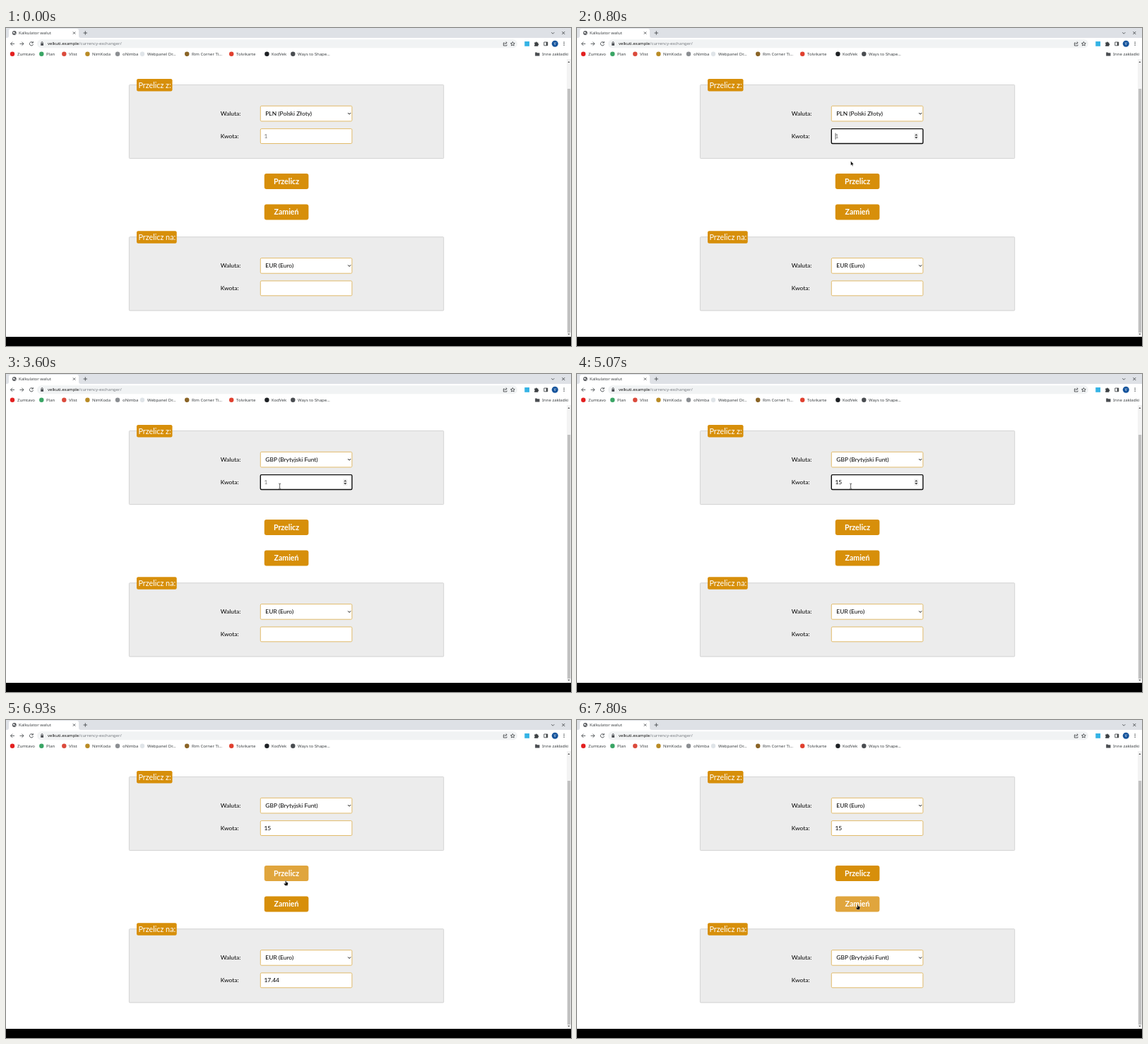
Write an HTML page that moves like this. It is 800x450 px and loops after 8000 ms.

```html
<!DOCTYPE html>
<html lang="pl">
<head>
<meta charset="utf-8">
<title>Kalkulator walut</title>
<style>
  html, body { margin: 0; width: 100%; height: 100%; overflow: hidden; background: #fff; }
  svg { display: block; width: 100%; height: 100%; }
  .ui { font: 6px "Noto Sans", "Open Sans", sans-serif; fill: #3c4043; }
  .page { font: 8.45px Lato, sans-serif; fill: #000; }
  .legend { font-size: 10.8px; fill: #fff; }
  .button { font-size: 10.6px; font-weight: bold; fill: #fff; text-anchor: middle; }
  .line { fill: none; stroke: #4a4d51; stroke-width: .9; }
  .field { fill: #fff; stroke: #dfb55c; stroke-width: .9; }
  .field.focus { stroke: #101010; stroke-width: 1.4; }
</style>
</head>
<body>
<svg viewBox="0 0 800 450">
  <rect width="800" height="450" fill="#fff"/>
  <g class="ui">
    <rect width="800" height="14" fill="#dee1e6"/>
    <path d="M1 14Q4 14 4 11V4Q4 1 7 1H100Q103 1 103 4V11Q103 14 106 14Z" fill="#fff"/>
    <circle cx="11.8" cy="7" r="2.9" fill="#55585c"/>
    <path d="M9.7 6.2l1.8-.9 1 1.1-1.2 1.8zM12.5 8l1.5-.5-.7 1.5z" fill="#fff"/>
    <text x="18" y="9.2">Kalkulator walut</text>
    <path class="line" d="M94.9 5.4l3.3 3.3m0-3.3l-3.3 3.3M109.6 7h5.4M112.3 4.3v5.4M772.3 6.2l2 2 2-2M787.3 5l4 4m0-4l-4 4"/>

    <rect x="44" y="16.2" width="680" height="12" rx="6" fill="#f1f3f4"/>
    <path class="line" d="M12 22.3H6.5m2.6-2.6l-2.6 2.6 2.6 2.6M19.5 22.3H25m-2.6-2.6l2.6 2.6-2.6 2.6M38 20.7a2.6 2.6 0 1 0 .5 2.2M38.3 19v2.1h-2.1"/>
    <path d="M49.2 21.6h3.8v3.2h-3.8z" fill="#4a4d51"/>
    <path class="line" d="M50 21.7v-1a1.1 1.1 0 0 1 2.2 0v1"/>
    <text x="59" y="24.4" fill="#111">velkuti.example<tspan fill="#777b80">/currency-exchanger/</tspan></text>
    <path class="line" stroke-width=".7" d="M706 21h-1.6v4h4.6v-1.5M706 23.2q.5-2.3 3-2.3m-1.2-1.4l1.5 1.4-1.5 1.4M717.4 19.5l.9 1.9 2 .2-1.5 1.4.4 2-1.8-1-1.8 1 .4-2-1.5-1.4 2-.2z"/>
    <rect x="734.3" y="19" width="6.8" height="6.8" fill="#35b4e5"/>
    <path d="M748.2 20.6h1.6a1 1 0 0 1 2 0h1.6v1.7a1 1 0 0 1 0 2v1.4h-5.2v-1.6a1 1 0 0 0 0-1.8z" fill="#3c4043"/>
    <path class="line" d="M761.8 20h5v4.8h-5z"/><path d="M764.8 20h2v4.8h-2z" fill="#3c4043"/>
    <circle cx="777.3" cy="22.3" r="4.5" fill="#17559d"/>
    <text x="777.3" y="24.2" font-size="5" text-anchor="middle" style="fill:#fff;font-size:5px">V</text>
    <path d="M789.5 19.5h1.2v1.2h-1.2zm0 2.2h1.2v1.2h-1.2zm0 2.2h1.2v1.2h-1.2z" fill="#3c4043"/>
    <g id="bookmarks"></g>
    <path d="M749.2 34.4h2.3l.8.9h3.2v4.3h-6.3z" fill="#4a4d51"/>
    <text x="759" y="39.1">Inne zakładki</text>
  </g>

  <rect x="794" y="44" width="6" height="393" fill="#f3f3f3"/>
  <rect x="795" y="86" width="4.2" height="345" fill="#c1c1c1"/>
  <path d="M795.4 49l1.5-2 1.5 2zM795.4 432.5l1.5 2 1.5-2z" fill="#555"/>
  <rect y="437" width="800" height="13"/>

  <g class="page">
    <g id="from"></g>
    <g id="to" transform="translate(0 215.3)"></g>
    <g id="buttons"></g>
    <g id="spinner">
      <rect x="477.3" y="148.4" width="6" height="9.6" fill="#efefef"/>
      <path d="M478.2 152.3l2.1-2.4 2.1 2.4zM478.2 154l2.1 2.4 2.1-2.4z" fill="#444"/>
    </g>
    <rect id="caret" y="148.6" width=".7" height="9.2" fill="#222"/>
  </g>
  <g id="pointer">
    <path id="arrow" d="M0 0V6.2L1.4 5 2.4 7.2 3.4 6.7 2.5 4.6H4.3Z" stroke="#fff" stroke-width=".4"/>
    <path id="beam" d="M-1.5-3.4Q0-3.4 0-2.6Q0-3.4 1.5-3.4M0-2.6V3.2M-1.5 3.9Q0 3.9 0 3.2Q0 3.9 1.5 3.9" fill="none" stroke="#333" stroke-width=".75"/>
    <path id="hand" d="M-.7.5Q0-.4.6.5V2.3L2.7 2.8Q3.3 3 3.1 4L2.5 7H-1.1L-2.7 4.6Q-2.7 3.6-1.7 4L-.7 4.7Z" stroke="#fff" stroke-width=".35"/>
  </g>
</svg>
<script>
const $ = id => document.getElementById(id);
const show = (id, on) => $(id).setAttribute('visibility', on ? 'visible' : 'hidden');
const within = (n, ...spans) => spans.some(([a, b]) => n >= a && n < b);
const GOLD = '#d78f0a', PALE = '#e0a53d';

// icon centre, icon colour, label start, label
const bookmarks = [
  [9, '#e32020', 16, 'Zumtavo'], [50.3, '#3aa565', 57, 'Plan'],
  [82.3, '#db4a3c', 89, 'Vlist'], [115.4, '#b98b25', 122, 'NimKoda'],
  [158, '#8b8e92', 165, 'oNimba'], [193, '#dfe4e8', 200, 'Webpanel Dr…'],
  [256.2, '#8a6426', 263, 'Rim Corner Ti…'], [319.2, '#e0402f', 326, 'Tolvikarte'],
  [369.4, '#1d2024', 376, 'KodVek'], [406.3, '#4a4d51', 413, 'Ways to Shape…']
];
$('bookmarks').innerHTML = bookmarks.map(([cx, color, x, name]) =>
  `<circle cx="${cx}" cy="36.8" r="3.2" fill="${color}"/><text x="${x}" y="39.1">${name}</text>`).join('');

function panel(id, title, width) {
  $(id).innerHTML = `
    <rect x="174.4" y="80.4" width="445.3" height="104.2" rx="1" fill="#ececec" stroke="#c9c9c9" stroke-width=".8"/>
    <rect x="185" y="72" width="${width}" height="17.4" rx="2.2" fill="${GOLD}"/>
    <text class="legend" x="187.4" y="84.6">${title}</text>
    <text x="303.8" y="124.1">Waluta:</text><text x="303.8" y="156.2">Kwota:</text>
    <rect class="field" x="360.3" y="110.3" width="129.6" height="21.6" rx="1.5"/>
    <path d="M484.2 120.1l2 2 2-2" fill="none" stroke="#111" stroke-width="1"/>
    <text id="${id}Unit" x="367.3" y="124.1"></text>
    <rect id="${id}Input" class="field" x="360.3" y="142.6" width="129.6" height="20.9" rx="1.5"/>
    <text id="${id}Value" x="365.4" y="156.2"></text>`;
}
panel('from', 'Przelicz z:', 50.5);
panel('to', 'Przelicz na:', 56.7);

const buttons = [['convert', 'Przelicz', 206], ['swap', 'Zamień', 249.4]];
$('buttons').innerHTML = buttons.map(([id, label, y]) =>
  `<rect id="${id}" x="365.8" y="${y}" width="62.6" height="22" rx="3"/>
   <text class="button" x="397" y="${y + 14.8}">${label}</text>`).join('');

// pointer stops: tick, x, y
const path = [
  [1, 440, 345], [6, 386, 155], [8, 386, 158], [12, 387.6, 188.3], [18, 392, 286],
  [26, 411, 124], [30, 411, 124], [31, 413, 131], [41, 418, 136], [45, 387.6, 158.4],
  [80, 387.6, 158.4], [89, 396, 219], [103, 396, 219], [104, 396.2, 227.2],
  [113, 397.6, 261.2], [120, 397.6, 261.2]
];
function pointerAt(n) {
  const i = Math.max(1, path.findIndex(p => p[0] >= n));
  const [a, x, y] = path[i - 1], [b, x2, y2] = path[i];
  const u = Math.max(0, (n - a) / (b - a)), s = u * u * (3 - 2 * u);
  return [x + (x2 - x) * s, y + (y2 - y) * s];
}

const PLN = 'PLN (Polski Złoty)', GBP = 'GBP (Brytyjski Funt)', EUR = 'EUR (Euro)';

function draw(n) {
  const [x, y] = pointerAt(n);
  const visible = n >= 1 && !within(n, [33, 41]);
  const over = (top, bottom, left, right) => visible && x > left && x < right && y > top && y < bottom;
  const onInput = over(142, 164, 360, 490);
  const hovers = buttons.map(([, , top]) => over(top, top + 22, 366, 428));
  const onButton = hovers.includes(true);
  buttons.forEach(([id], i) => $(id).setAttribute('fill', hovers[i] ? PALE : GOLD));

  const swapped = n >= 115;
  $('fromUnit').textContent = swapped ? EUR : n < 41 ? PLN : GBP;
  $('toUnit').textContent = swapped ? GBP : EUR;
  const typed = '15'.slice(0, Math.max(0, n - 65));
  $('fromValue').textContent = typed || '1';
  $('fromValue').setAttribute('fill', typed ? '#000' : '#777');
  $('toValue').textContent = within(n, [95, 115]) ? '17.44' : '';

  const focus = within(n, [7, 26], [48, 93]);
  $('fromInput').classList.toggle('focus', focus);
  show('spinner', focus || onInput);
  show('caret', within(n, [7, 14], [48, 54], [66, 76], [81, 93]));
  $('caret').setAttribute('x', 365.7 + 4.9 * typed.length);

  $('pointer').setAttribute('transform', `translate(${x} ${y})`);
  show('arrow', visible && !onInput && !onButton);
  show('beam', onInput);
  show('hand', onButton);
}

const start = performance.now();
function loop() {
  const t = (performance.now() - start) % 8000;
  draw(Math.floor((t + 5) * .015) % 120);
  requestAnimationFrame(loop);
}
loop();
</script>
</body>
</html>
```
